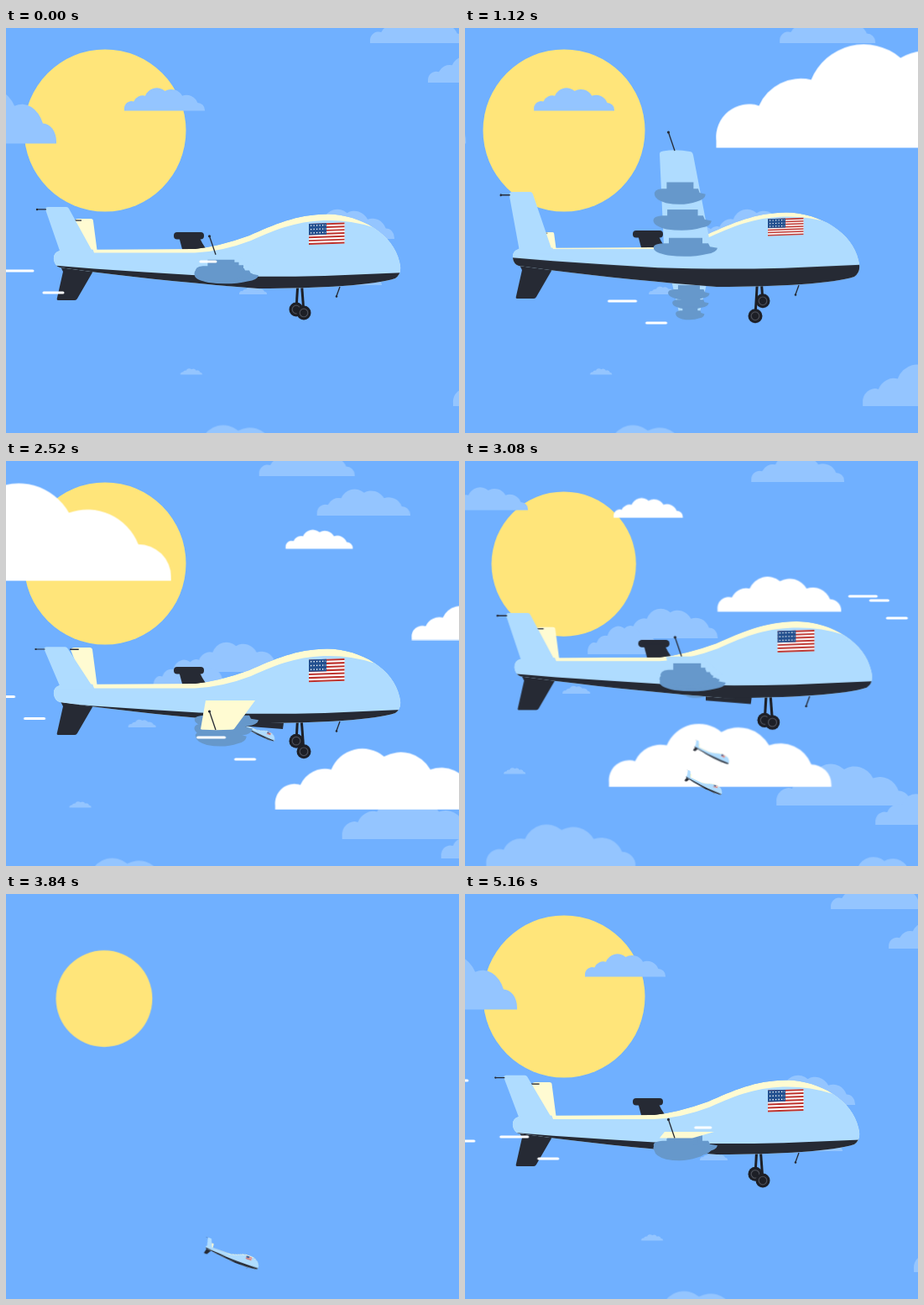
Animation of 540x482 px, one loop 5200 ms. Source, as an HTML page without scripts:

```html
<!DOCTYPE html>
<html lang="en">
<head>
<meta charset="utf-8">
<title>Drone flight</title>
<style>
@property --r { syntax: '<number>'; inherits: true; initial-value: -13; }

html, body { margin: 0; width: 100%; height: 100%; overflow: hidden; background: #70b0ff; }
svg { display: block; width: 100%; height: 100%; }

.light { fill: #afdcff; }
.cream { fill: #fffbd2; }
.dark { fill: #262a34; }
.steel { fill: #6698cb; }
.wire { stroke: #262a34; stroke-width: 1.3; fill: none; }
.streak { stroke: #fff; stroke-width: 3; stroke-linecap: round; }
.far { fill: #94c5ff; }
.white { fill: #fff; }

.sun, .skyA, .skyB, .slideA, .slideB, .cam, .plane, .bob, .lead, .bomb,
.drift, .rise, .hatch, .wings, .gear, .pod { animation: 5.2s linear infinite; }

/* camera and sky */
.sun { transform-origin: 118px 122px; animation-name: sun; }
@keyframes sun {
  0%, 52% { transform: none; animation-timing-function: ease-in; }
  66.92% { transform: translate(-1px, 2px) scale(.642); animation-timing-function: ease-out; }
  74%, 83.08% { transform: translate(-1px, 2.5px) scale(.595); animation-timing-function: ease-in-out; }
  98%, 100% { transform: none; }
}
.slideA { animation-name: slideA; }
.slideB { animation-name: slideB; }
@keyframes slideA { to { transform: translateX(-273px); } }
@keyframes slideB { from { transform: translateX(273px); } to { transform: none; } }
.skyA { animation-name: skyA; }
@keyframes skyA {
  0%, 52% { transform: none; animation-timing-function: cubic-bezier(.45, 0, .8, .7); }
  66.92% { transform: translateY(-152.5px); }
  76%, 100% { transform: translateY(-900px); }
}
.skyB { animation-name: skyB; }
@keyframes skyB {
  0%, 68% { transform: translateY(1200px); }
  83.08% { transform: translateY(250px); animation-timing-function: cubic-bezier(.2, .6, .5, 1); }
  98%, 100% { transform: none; }
}
.cam { animation-name: cam; }
@keyframes cam {
  0%, 52% { transform: none; animation-timing-function: cubic-bezier(.45, 0, .8, .7); }
  66.92% { transform: translate(1px, -154px) scale(1.12); }
  76.53% { transform: translate(1px, -900px) scale(1.12); }
  76.54%, 100% { transform: none; }
}
.brief { animation-name: cam, brief; }
@keyframes brief { 0%, 76% { opacity: 1; } 76.01%, 100% { opacity: 0; } }
.drift { animation-name: drift; }
@keyframes drift { to { transform: translateX(var(--d)); } }
.fast { --d: -5564px; }
.rise { animation-name: rise; }
@keyframes rise {
  0%, 59.75% { transform: translateY(900px); }
  66.95% { transform: none; }
  74.15%, 100% { transform: translateY(-900px); }
}
.late { animation-delay: -4.36s; }

/* aircraft: --r is the height of the near wing tip below its root */
.plane { transform-origin: 263.5px 283.5px; animation-name: plane, roll; }
@keyframes plane {
  0%, 76.53% { transform: none; }
  76.54% { transform: translate(4px, 150px) rotate(19deg) scale(.18); }
  83.08% { transform: translate(-19.5px, 160.5px) rotate(9.5deg) scale(.376); animation-timing-function: ease-in-out; }
  98%, 100% { transform: translate(0, 0) rotate(0deg) scale(1); }
}
@keyframes roll {
  0% { --r: -13; animation-timing-function: cubic-bezier(.2, .5, .5, 1); }
  21.54% { --r: -135; animation-timing-function: cubic-bezier(.45, 0, .7, .75); }
  37.69% { --r: -22; animation-timing-function: cubic-bezier(.3, .5, .6, 1); }
  48.46% { --r: 35; animation-timing-function: ease-in-out; }
  66.92% { --r: -52; animation-timing-function: ease-in-out; }
  76.5%, 90% { --r: -13; }
  96% { --r: 38; }
  99.23% { --r: 8; }
  100% { --r: -13; }
}
.bob { animation-name: bob; }
@keyframes bob {
  0%, 76.5%, 100% { transform: none; }
  21.54% { transform: translateY(-2px); }
  37.69% { transform: translateY(3.5px); }
  48.46% { transform: translateY(2px); }
  66.92% { transform: translateY(3px); }
}
.band { transform: translateY(calc((var(--r) + 13) * .02px)); }
.belly { transform: translateY(calc((var(--r) + 13) * .06px)); }
.fin { transform-origin: 100px 268px;
  transform: skewX(calc((var(--r) + 13) * .04deg)) scaleY(calc(1 - (var(--r) + 13) * .0024)); }
.fin2 { transform-origin: 109px 268px; transform: scale(calc(1 + (var(--r) + 13) * .0036)); }
.flag { transform: translateY(calc((var(--r) + 13) * .03px)) scaleY(calc(1 + (var(--r) + 13) * .0016)); }
.wing { transform-origin: 0 283px; transform: scaleY(calc(var(--r) / -137)); }
.wing2 { transform-origin: 0 290px; transform: scaleY(calc(var(--r) / -137)); }
.top { opacity: calc((var(--r) + 11) * 9); }
.tip { transform: translateY(calc(var(--r) * 1px)); }
.pods g { transform: translateY(calc(var(--r) * var(--k) * 1px)); }
.w1 { transform: translateY(calc((var(--r) + 13) * .1px)); }
.w2 { transform: translateY(calc((var(--r) + 13) * -.08px)); }

.wings { transform-origin: 265px 285px; animation-name: wings; }
@keyframes wings { 0%, 76.53% { transform: none; } 76.54%, 89% { transform: scale(0); } 96%, 100% { transform: none; } }
.gear { animation-name: gear; }
@keyframes gear { 0%, 76.53% { transform: none; } 76.54%, 89% { transform: translateY(-52px); } 96%, 100% { transform: none; } }
.pod { animation-name: pod; }
@keyframes pod { 0%, 76.53% { transform: none; } 76.54%, 89% { transform: translateY(28px); } 96%, 100% { transform: none; } }
.hatch { animation-name: hatch; }
@keyframes hatch {
  0%, 33% { transform: translateY(-16px); }
  38.5%, 76% { transform: none; }
  76.5%, 100% { transform: translateY(-16px); }
}

/* falling craft */
.lead, .bomb { --r: -65; transform-origin: 263.5px 283.5px; }
.lead { animation-name: lead; }
@keyframes lead {
  0%, 47.5% { transform: translate(30px, 20px) rotate(10deg) scale(.1); opacity: 0; }
  47.51% { opacity: 1; }
  48.4% { transform: translate(36.5px, 39px) rotate(25deg) scale(.107); }
  66.92% { transform: translate(10px, 147.5px) rotate(25deg) scale(.12); }
  76.53% { transform: translate(4px, 150px) rotate(19deg) scale(.18); opacity: 1; }
  76.54%, 100% { transform: translate(4px, 150px) rotate(19deg) scale(.18); opacity: 0; }
}
.bomb { animation-name: bomb; }
@keyframes bomb {
  0%, 48.07% { transform: translate(38.5px, 38.5px) rotate(25deg) scale(.107); opacity: 0; }
  48.08% { transform: translate(38.5px, 38.5px) rotate(25deg) scale(.107); opacity: 1; }
  75% { transform: translate(-48px, 318.5px) rotate(25deg) scale(.107); opacity: 1; }
  75.01%, 100% { transform: translate(-48px, 318.5px) rotate(25deg) scale(.107); opacity: 0; }
}
</style>
</head>
<body>
<svg viewBox="0 0 540 482" preserveAspectRatio="none">
  <defs>
    <path id="cloud" d="M0 0V-2A9 9 0 0 1 11.7 -11.5A12.5 12.5 0 0 1 26 -18.6A15.6 15.6 0 0 1 50.5 -24.6A15.8 15.8 0 0 1 72 -18.6A15 15 0 0 1 91 -10A9 9 0 0 1 100 -1V0Z"/>

    <g id="sky" class="far">
      <use href="#cloud" transform="translate(434 18) scale(1.14)"/>
      <use href="#cloud" transform="translate(503 65) scale(1.11)"/>
      <use href="#cloud" transform="translate(141 98.5) scale(.96)"/>
      <use href="#cloud" transform="translate(-118 137.5) scale(1.78 2.4)"/>
      <use href="#cloud" transform="translate(349 251) scale(1.14 1.25)"/>
      <use href="#cloud" transform="translate(308 270) scale(.9 1.18)"/>
      <use href="#cloud" transform="translate(278 317) scale(.33)"/>
      <use href="#cloud" transform="translate(400 306) scale(.48)"/>
      <use href="#cloud" transform="translate(208 412.5) scale(.26)"/>
      <use href="#cloud" transform="translate(187 523) scale(1.78)"/>
      <use href="#cloud" transform="translate(533 450) scale(1.6 1.75)"/>
      <use href="#cloud" transform="translate(651 473) scale(1.2 1.3)"/>
      <use href="#cloud" transform="translate(596 548) scale(1.3)"/>
      <use href="#cloud" transform="translate(101 -15) scale(.63)"/>
    </g>

    <g id="pair" class="streak">
      <path d="M1 0H33M46 26H69"/>
    </g>

    <path id="shape" d="M57 276Q56 267 64 265L105 263.5L225 263Q254 260 290 247C320 234 345 222 383 221.5C424 222 462 246 469 278Q473 292 464 298C440 306 375 310 300 310C235 305 165 298 105 290.5L64 285Q58 283 57 276Z"/>
    <clipPath id="trim"><use href="#shape"/></clipPath>

    <g id="hull">
      <g class="fin2">
        <path class="cream" d="M82 230Q82 227 86 227H101Q104 227 104 230L109 268H97Z"/>
        <path class="wire" d="M81 229H90"/>
      </g>
      <path class="dark" d="M63 280L105 287L103 291L85 322Q84 324 82 324H62Q60 324 61 321L68 290Z"/>
      <g clip-path="url(#trim)">
        <use href="#shape" class="cream"/>
        <path class="light band" d="M50 262H103L105 267.5H225Q258 266 292 253C325 238 350 229 385 229Q412 229 437 237L480 230V330H50Z"/>
        <path class="dark belly" d="M50 282L105 286.5L165 290.5L230 294.5Q300 297 380 295L475 291V330H50Z"/>
      </g>
      <g class="fin">
        <path class="light" d="M47 216Q47 213 50 213H72Q74 213 75 215L102 264L106 270H62L64 265Z"/>
        <path class="wire" d="M37 216H48"/>
        <circle class="dark" cx="37" cy="216" r="1.2"/>
      </g>
      <g transform="translate(361 233) skewY(-2)">
        <g class="flag">
          <rect width="42.5" height="25" fill="#fff"/>
          <path d="M21.25 0V25" stroke="#bd332e" stroke-width="42.5" stroke-dasharray="1.92"/>
          <rect width="21" height="13.4" fill="#23508f"/>
          <path d="M2 2.3H20M2 6.7H20M2 11H20" stroke="#fff" stroke-width="1.3" stroke-dasharray="1.3 2.2"/>
        </g>
      </g>
      <path class="wire" d="M398 308L394 319"/>
      <circle class="dark" cx="394" cy="319.5" r="1.3"/>
    </g>

    <path id="engine" d="M243 0H283V8H290L292 13L301 15Q300 22 288 24Q268 30 242 26Q226 22 225 16Q223 9 236 8H243Z"/>
    <path id="panel" d="M238 283L232 150Q232 147 236 146.5Q252 144 268 147Q271 147 272 151L297 283Z"/>
    <g id="wheel">
      <circle r="8.5" fill="#1d1f26"/>
      <circle r="4.8" fill="none" stroke="#4b4e57" stroke-width="1.2"/>
    </g>
  </defs>

  <rect width="540" height="482" fill="#70b0ff"/>
  <rect class="rise late" x="88" y="-254" width="6.5" height="327" fill="#b8d8ff"/>
  <circle class="sun" cx="118" cy="122" r="96.5" fill="#ffe57a"/>
  <g class="skyA"><g class="slideA"><use href="#sky"/></g></g>
  <g class="skyB"><g class="slideB"><use href="#sky"/></g></g>

  <g class="cam brief">
    <g class="white">
      <g class="drift" style="--d:-1997px"><use href="#cloud" transform="translate(730 142.5) scale(4.35)"/></g>
      <g class="drift" style="--d:-1503px"><use href="#cloud" transform="translate(1062 104.5) scale(.8)"/></g>
      <g class="drift" style="--d:-1437px"><use href="#cloud" transform="translate(1017.5 415) scale(2.57)"/></g>
      <g class="drift" style="--d:-1784px"><use href="#cloud" transform="translate(1348.5 213) scale(1.43)"/></g>
    </g>
    <use href="#hull" class="bomb" style="animation-delay:-4.58s"/>
    <use href="#hull" class="bomb" style="animation-delay:-4.9s"/>
  </g>
  <use href="#hull" class="lead"/>

  <g class="cam">
    <g class="plane">
      <g class="bob">
        <g class="wings">
          <path class="light wing2" d="M243 290H292L279 345H256Z"/>
          <g class="steel pods">
            <g style="--k:-.155"><use href="#engine" transform="translate(96 287) scale(.65)"/></g>
            <g style="--k:-.25"><use href="#engine" transform="translate(119 287) scale(.57)"/></g>
            <g style="--k:-.345"><use href="#engine" transform="translate(150 287) scale(.45 .57)"/></g>
          </g>
        </g>
        <g class="pod dark">
          <rect x="200" y="243" width="36" height="8.5" rx="4"/>
          <path d="M206 248H230L234 256L241 267H211Z"/>
        </g>
        <path class="hatch dark" d="M278 302H332L330 317L278 313Z"/>
        <g class="gear" stroke="#1d1f26" stroke-width="3">
          <g class="w2"><path d="M349 285L346 335"/><use href="#wheel" x="346" y="335" stroke="none"/></g>
          <g class="w1"><path d="M351 285L355 339"/><use href="#wheel" x="355" y="339" stroke="none"/></g>
        </g>
        <use href="#hull"/>
        <g class="wings">
          <use href="#panel" class="wing light"/>
          <g class="steel pods">
            <g style="--k:.25"><use href="#engine" transform="translate(0 285.5) scale(1 .8)"/></g>
            <g style="--k:.5"><use href="#engine" transform="translate(20 285.5) scale(.91 .9)"/></g>
            <g style="--k:.74"><use href="#engine" transform="translate(46 285.5) scale(.8 .95)"/></g>
          </g>
          <g class="top"><use href="#panel" class="wing cream"/></g>
          <g class="tip">
            <path class="wire" d="M250 283L242.500 261"/>
            <circle class="dark" cx="242.500" cy="261" r="1.6"/>
          </g>
        </g>
      </g>
    </g>
  </g>

  <g class="drift fast">
    <use href="#pair" x="0" y="289"/>
    <use href="#pair" x="5564" y="289"/>
    <use href="#pair" x="1370" y="325"/>
    <use href="#pair" x="2047" y="205"/>
    <use href="#pair" x="2674" y="280.500"/>
    <use href="#pair" x="2925" y="329"/>
    <use href="#pair" x="3754" y="161"/>
    <use href="#pair" x="5456" y="196"/>
    <use href="#pair" x="5464" y="268"/>
    <path class="streak" d="M233 278H251M5797 278H5815M3780 166H3801"/>
  </g>
  <rect class="rise white" x="479.500" y="59" width="7" height="327" rx="3.500"/>
</svg>
</body>
</html>
```
